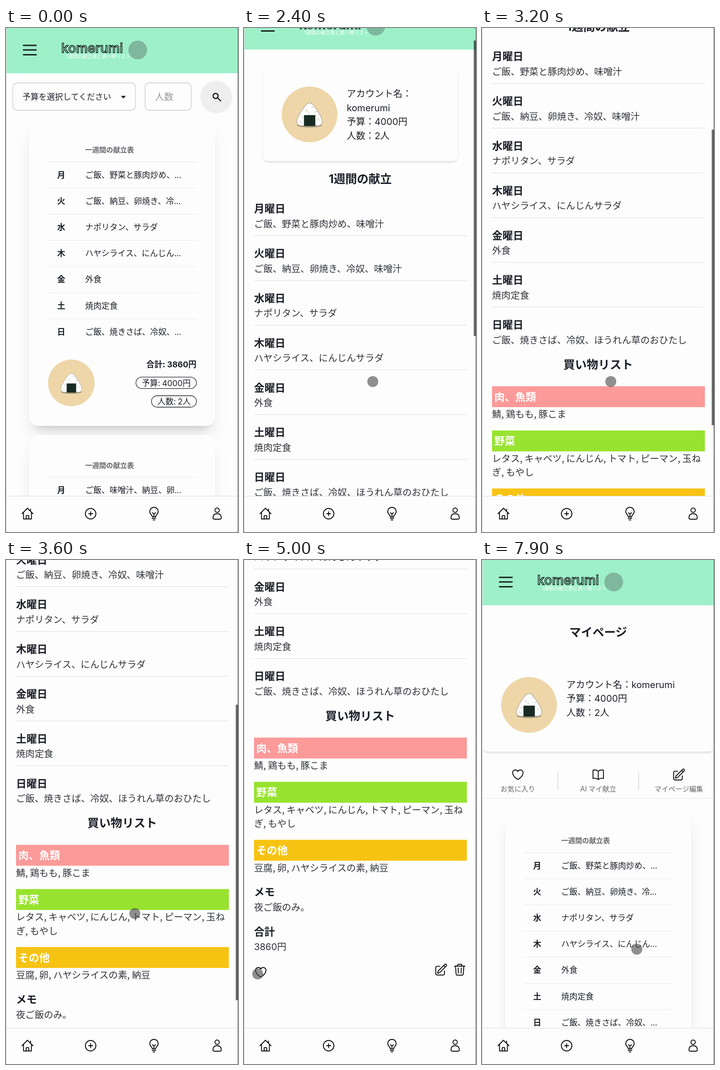
Write an HTML page that moves like this. It is 508x1102 px and loops after 8 s.

```html
<!DOCTYPE html>
<html lang="ja">
<head>
<meta charset="utf-8">
<title>献立アプリ</title>
<style>
html, body { margin: 0; width: 100%; height: 100%; overflow: hidden; background: #fdfdfd; }
svg { display: block; width: 508px; height: 1102px; font-family: "Noto Sans CJK JP", "Noto Sans CJK", sans-serif; }
.latin { font-family: Inter, "Open Sans", sans-serif; }
.icon { fill: none; stroke: #0b0b0d; stroke-width: 1.5; stroke-linecap: round; stroke-linejoin: round; }
.nav { stroke-width: 2; }
</style>
</head>
<body>
<svg id="stage" viewBox="0 0 508 1102"></svg>
<script>
const LOOP = 8000, REM = 20.32, SMALL = 17.78, TINY = 15.24, HEAD = 22.86, TITLE = 25.4;
const INK = '#1c1f28', BODY = '#303239', MUTED = '#66676d', PAGE = '#fdfdfd', MINT = '#9ef0c9';
const BRAND = 'komerumi';
const DAYS = [...'月火水木金土日'];

// y is the optical centre of the line
function text(str, x, y, size, { fill = INK, bold = false, anchor = 'start' } = {}) {
  const runs = str.replace(/\w+/g, '<tspan class="latin">$&</tspan>');
  return `<text x="${x}" y="${y + size * 0.38}" font-size="${size}" fill="${fill}" font-weight="${bold ? 700 : 400}" text-anchor="${anchor}">${runs}</text>`;
}
const rect = (x, y, w, h, fill, r = 0, extra = '') =>
  `<rect x="${x}" y="${y}" width="${w}" height="${h}" rx="${r}" fill="${fill}" ${extra}/>`;
const blurRect = (x, y, w, h, r, blur, alpha) =>
  rect(x, y, w, h, `rgba(0,0,0,${alpha})`, r, `style="filter:blur(${blur}px)"`);
const line = (x, y, w, color = '#e4e4e7') => rect(x, y, w, 1.3, color);

const ICONS = {
  heart: 'M21 8.25c0-2.485-2.099-4.5-4.688-4.5-1.935 0-3.597 1.126-4.312 2.733-.715-1.607-2.377-2.733-4.313-2.733C5.1 3.75 3 5.765 3 8.25c0 7.22 9 12 9 12s9-4.78 9-12z',
  edit: 'M16.86 4.49l1.69-1.69a1.87 1.87 0 1 1 2.65 2.65L10.58 16.07a4.5 4.5 0 0 1-1.9 1.13L6 18l.8-2.69a4.5 4.5 0 0 1 1.13-1.9zM16.86 4.49L19.5 7.12M18 14v4.75A2.25 2.25 0 0 1 15.75 21H5.25A2.25 2.25 0 0 1 3 18.75V8.25A2.25 2.25 0 0 1 5.25 6H10',
  trash: 'M3 5.7H21M4.8 5.7l1 13.5a2.2 2.2 0 0 0 2.2 2h8a2.2 2.2 0 0 0 2.2-2l1-13.5M9.3 9l.3 8.8M14.7 9l-.3 8.8M8.2 5.5v-1a2 2 0 0 1 2-2h3.6a2 2 0 0 1 2 2v1',
  book: 'M12 6A9 9 0 0 0 6 3.75Q4.4 3.75 3 4.26V18.5A9 9 0 0 1 6 18Q9.4 18 12 20.3Q14.6 18 18 18A9 9 0 0 1 21 18.5V4.26Q19.6 3.75 18 3.75A9 9 0 0 0 12 6V20.3'
};
const icon = (name, x, y, attrs = '') =>
  `<path class="icon" d="${ICONS[name]}" transform="translate(${x} ${y}) scale(1.27) translate(-12 -12)" ${attrs}/>`;

function avatar(x, y, r) {
  return `<g transform="translate(${x} ${y}) scale(${r / 51})">
    <circle r="51" fill="#eed6a8"/>
    <ellipse cy="20" rx="22.5" ry="4" fill="#a99a80"/>
    <path d="M-7-17Q0-25 7-17Q17-5 22.500 9Q25 20 15 20.500H-15Q-25 20-22.500 9Q-17-5-7-17Z" fill="#fff" stroke="#aaa69c" stroke-width="1"/>
    <path d="M-7-9l3 4M4-13l4-1M9-4l5-2M-16 5l4-1M-18 12l3 4M15 7l3 4M-3-2l3-1" stroke="#b9b9b6" fill="none"/>
    <rect x="-10.200" y="1.200" width="20.800" height="20" fill="#182a23"/>
  </g>`;
}

function header() {
  const bars = [38, 48, 58.5].map(y => `M38.3 ${y}H66`).join('');
  return rect(0, 0, 508, 99, MINT)
    + `<path d="${bars}" stroke="#18201f" stroke-width="2.8" stroke-linecap="round"/>`
    + `<text class="latin" x="121" y="54" font-size="28.5" font-weight="500" fill="${MINT}" stroke="#111" stroke-width="1.4">${BRAND}</text>`
    + '<circle cx="288.5" cy="48" r="20.5" fill="#7fb79d"/>'
    + text('1週間の献立表と買い物リスト', 132, 62, 10.5, { fill: '#fff' });
}

const WEEK = ['ご飯、野菜と豚肉炒め、...', 'ご飯、納豆、卵焼き、冷...', 'ナポリタン、サラダ', 'ハヤシライス、にんじん...', '外食', '焼肉定食', 'ご飯、焼きさば、冷奴、...'];

function menuCard(top, meals) {
  const pill = (label, x, y) => rect(x, y - 12.5, 417 - x, 25, 'none', 12.5, 'stroke="#25272d" stroke-width="1.3"')
    + text(label, 404.5, y, SMALL, { anchor: 'end' });
  const rows = meals.map((meal, i) => {
    const y = 120.5 + i * 57.15;
    return line(92, y - 28.8, 325, '#eeeef0')
      + text(DAYS[i], 121, y, SMALL, { bold: true, anchor: 'middle' })
      + text(meal, 173.5, y, SMALL);
  }).join('');
  return `<g transform="translate(0 ${top})">`
    + blurRect(57, 31, 395, 658, 20, 16, 0.1) + blurRect(59, 20, 391, 654, 20, 6, 0.1)
    + rect(51, 0, 407, 669.5, PAGE, 20)
    + text('一週間の献立表', 173.5, 66, TINY, { fill: MUTED, bold: true })
    + rows + avatar(143, 575.5, 51)
    + text('合計: 3860円', 417, 534.5, SMALL, { bold: true, anchor: 'end' })
    + pill('予算: 4000円', 284.5, 575.3) + pill('人数: 2人', 318.5, 616) + '</g>';
}

function homePage() {
  const box = (x, w) => rect(x, 120, w, 60, PAGE, 10, 'stroke="#cbcbce" stroke-width="1.3"');
  return menuCard(200.5, WEEK)
    + menuCard(890, ['ご飯、味噌汁、納豆、卵...', ...WEEK.slice(1)])
    + header()
    + box(15, 268.5) + box(304.5, 101)
    + text('予算を選択してください', 36, 150, SMALL)
    + '<path d="M251.5 148.5h11l-5.5 5.5z" fill="#111"/>'
    + text('人数', 326, 150, REM, { fill: '#9a9ba1' })
    + blurRect(427, 118, 67, 67, 33, 2, 0.1)
    + '<circle cx="460.5" cy="150" r="34" fill="#eeeeee"/>'
    + '<path class="icon" style="stroke-width:2.4" d="M464.5 148.5a5.5 5.5 0 1 1-11 0a5.5 5.5 0 1 1 11 0M463.5 153l6.5 6.5"/>';
}

const infoCard = (x, y, w) => blurRect(x + 1, y + 3, w - 2, 203, 10, 2, 0.17) + rect(x, y, w, 204, PAGE, 10);
const lines = (list, x, y) => list.map((s, i) => text(s, x, y + i * 30.5, REM)).join('');
const title = (s, y) => text(s, 254.5, y, TITLE, { bold: true, anchor: 'middle' });

const FULL_WEEK = ['ご飯、野菜と豚肉炒め、味噌汁', 'ご飯、納豆、卵焼き、冷奴、味噌汁', 'ナポリタン、サラダ', 'ハヤシライス、にんじんサラダ', '外食', '焼肉定食', 'ご飯、焼きさば、冷奴、ほうれん草のおひたし'];
const SHOPPING = [
  ['肉、魚類', '#fb9a99', 1168.3, ['鯖, 鶏もも, 豚こま']],
  ['野菜', '#98e32f', 1265, ['レタス, キャベツ, にんじん, トマト, ピーマン, 玉ね', 'ぎ, もやし']],
  ['その他', '#f7c313', 1391.8, ['豆腐, 卵, ハヤシライスの素, 納豆']]
];

function detailPage() {
  const entry = (head, body, y) => text(head, 22, y, HEAD, { bold: true }) + text(body, 22, y + 33.5, REM, { fill: BODY });
  const week = FULL_WEEK.map((meal, i) => {
    const y = 446.5 + i * 97.83;
    return entry(DAYS[i] + '曜日', meal, y) + (i < 6 ? line(22, y + 59, 466) : '');
  }).join('');
  const shopping = SHOPPING.map(([name, color, y, items]) =>
    rect(22, y, 466, 45.7, color) + text(name, 27, y + 22.7, HEAD, { fill: '#fff', bold: true })
    + items.map((s, i) => text(s, 22, y + 61 + i * 30.5, REM, { fill: BODY })).join('')).join('');
  return header() + infoCard(42, 139, 426) + avatar(143.5, 241, 61)
    + lines(['アカウント名：', BRAND, '予算：4000円', '人数：2人'], 225, 195.5)
    + title('1週間の献立', 381) + week
    + title('買い物リスト', 1120) + shopping
    + entry('メモ', '夜ご飯のみ。', 1505.8) + entry('合計', '3860円', 1592)
    + icon('heart', 36.7, 1681.5, 'id="heart"') + icon('edit', 431.3, 1676) + icon('trash', 472.3, 1676);
}

function myPage() {
  const tabs = [['heart', 'お気に入り', 78.5], ['book', 'AI マイ献立', 254.5], ['edit', 'マイページ編集', 431]];
  return menuCard(547.5, WEEK) + header() + title('マイページ', 157)
    + infoCard(1, 215, 507) + avatar(103, 317, 61)
    + lines(['アカウント名：' + BRAND, '予算：4000円', '人数：2人'], 185, 272)
    + tabs.map(([name, label, x]) => icon(name, x, 469.5) + text(label, x, 500, TINY, { fill: MUTED, anchor: 'middle' })).join('')
    + rect(165.7, 462, 1.3, 41, '#d0d0d4') + rect(342.3, 462, 1.3, 41, '#d0d0d4')
    + line(0, 520.5, 508, '#ececee');
}

const NAV = [
  [47, 'M-12.5 0L0-12.5L12.5 0M-9-3V12H9V-3M-3 12V5.5a1.500 1.500 0 0 1 1.500-1.500h3a1.500 1.500 0 0 1 1.500 1.500V12M7-6V-10.5'],
  [185.3, 'M-12 0a12 12 0 1 1 24 0a12 12 0 1 1-24 0M-4.5 0H4.5M0-4.5V4.5'],
  [324, 'M-4 7Q-4 4-6.5 2A9.6 9.6 0 1 1 6.5 2Q4 4 4 7ZM-4 10.5H4M-2 14H2M0 7V0M-3.5-2L0 0L3.5-2'],
  [462.3, 'M-5-8a5 5 0 1 1 10 0a5 5 0 1 1-10 0M-9.5 9Q-9.5 0 0 0T9.5 9Q9.5 12.5 5.5 12.5H-5.500Q-9.5 12.5-9.5 9Z']
];

document.getElementById('stage').innerHTML =
  rect(0, 0, 508, 1102, PAGE)
  + `<g id="home">${homePage()}</g><g id="detail">${detailPage()}</g><g id="mine">${myPage()}</g>`
  + rect(0, 1023, 508, 79, PAGE) + line(0, 1023, 508, '#e2e2e5')
  + NAV.map(([x, d]) => `<path class="icon nav" d="${d}" transform="translate(${x} 1062) scale(.96)"/>`).join('')
  + rect(0, 0, 1.3, 1102, '#dcdcde') + rect(507, 0, 1, 1102, '#77777a')
  + rect(503, 0, 5, 646, 'rgba(0,0,0,.57)', 0, 'id="thumb"')
  + '<circle id="cursor" r="12" fill="rgba(70,70,70,.6)"/>';

const SCROLL = [[2000, 0], [2200, 14], [2400, 52], [2800, 215], [3200, 385], [4000, 706], [4250, 762], [4500, 780]];
const THUMB_FADE = [[2000, 0], [2100, 1], [4600, 1], [4900, 0]];
const CURSOR = [
  [400, 449, 1054], [700, 362, 900], [1000, 300, 798], [1300, 282, 773], [4500, 282, 773],
  [4700, 180, 822], [5000, 30, 905], [5200, 36, 903], [5900, 36, 903],
  [6200, 332, 1030], [6500, 460, 1066], [6800, 470, 1070], [7200, 470, 1070], [7600, 375, 920], [7900, 339, 851]
];

function sample(table, t) {
  if (t <= table[0][0]) return table[0].slice(1);
  const i = table.findIndex(row => row[0] > t);
  if (i < 0) return table[table.length - 1].slice(1);
  const a = table[i - 1], b = table[i], k = (t - a[0]) / (b[0] - a[0]);
  return a.slice(1).map((v, j) => v + (b[j + 1] - v) * k);
}

const [home, detail, mine, heart, thumb, cursor] =
  ['home', 'detail', 'mine', 'heart', 'thumb', 'cursor'].map(id => document.getElementById(id));
const show = (el, on) => el.setAttribute('display', on ? 'inline' : 'none');
const move = (el, x, y) => el.setAttribute('transform', `translate(${x} ${y})`);

function draw(now) {
  const t = Math.floor((Math.max(0, now - start) % LOOP) / 100) * 100;
  const [scroll] = sample(SCROLL, t);
  show(home, t < 1500);
  show(detail, t >= 1500 && t < 7200);
  show(mine, t >= 7200);
  move(detail, 0, -scroll);
  heart.style.fill = t >= 5300 ? '#000' : 'none';
  move(thumb, 0, scroll * 0.5855 - 3);
  thumb.setAttribute('opacity', sample(THUMB_FADE, t)[0]);
  show(cursor, t >= 400);
  move(cursor, ...sample(CURSOR, t));
  requestAnimationFrame(draw);
}
const start = performance.now();
draw(start);
</script>
</body>
</html>
```
